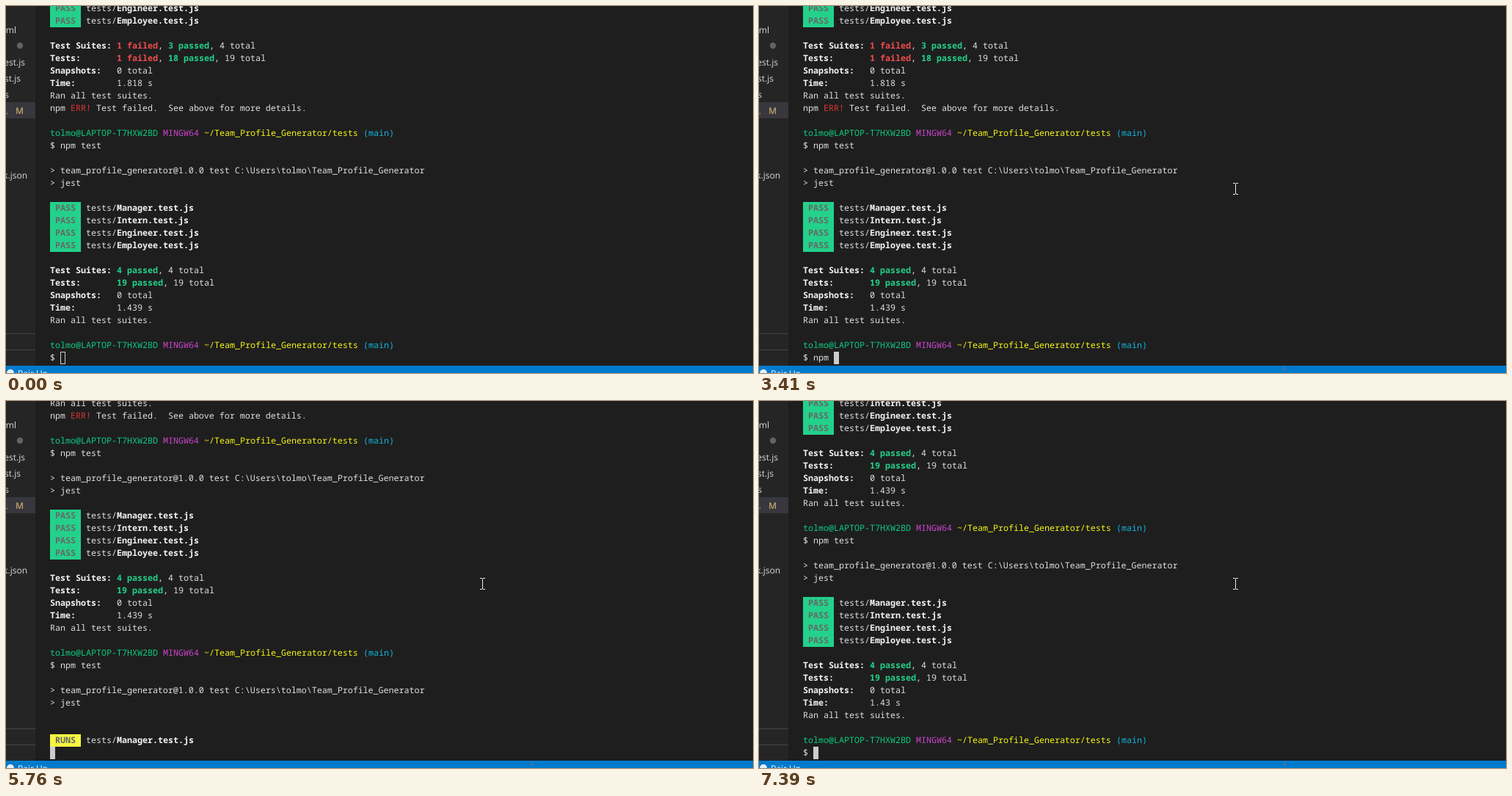
These frames come from a looping animation (1018 by 500 pixels, 8000 ms). An HTML page with a canvas:

```html
<!DOCTYPE html>
<html lang="en">
<head>
<meta charset="utf-8">
<title>Terminal test run</title>
<style>
  html, body { margin: 0; width: 100%; height: 100%; overflow: hidden; background: #1e1e1e; }
  canvas { display: block; }
</style>
</head>
<body>
<canvas id="stage" width="1018" height="500"></canvas>
<script>
const ctx = document.getElementById('stage').getContext('2d');
const LOOP = 8000;
const CELL = 7, LINE = 17, LEFT = 60, LAST_TOP = 471;
const MONO = '11.6667px "Noto Sans Mono", monospace';
const SANS = '12px "Open Sans", sans-serif';

// Style codes used as {x} inside terminal lines.
const STYLES = {
  w: { color: '#e0e0e0' },
  b: { color: '#f4f4f4', bold: true },
  R: { color: '#f14c4c', bold: true },
  G: { color: '#23d18b', bold: true },
  r: { color: '#dc3535' },
  g: { color: '#0dcb83' },
  m: { color: '#cb45cb' },
  y: { color: '#f5f518' },
  c: { color: '#12b5dc' },
  P: { color: '#666666', bold: true, back: '#23d18b' },
  Y: { color: '#666666', bold: true, back: '#f5f543' }
};

const USER = 'tolmo';
const PROMPT = `{g}${USER}@LAPTOP-T7HXW2BD {m}MINGW64 {y}~/Team_Profile_Generator/tests {c}(main)`;
const COMMAND = 'npm test';
const SUITES = ['Manager', 'Intern', 'Engineer', 'Employee'];

const pass = name => `{P} PASS {w} tests/{b}${name}.test.js`;
const runs = name => `{Y} RUNS {w} tests/{b}${name}.test.js`;
const PASSES = SUITES.map(pass);

const summary = (suites, tests, time) => [
  `{b}Test Suites: ${suites}{w}, 4 total`,
  `{b}Tests:       ${tests}{w}, 19 total`,
  '{b}Snapshots:   {w}0 total',
  `{b}Time:        {w}${time} s`,
  'Ran all test suites.'
];
const allPassed = time => summary('{G}4 passed', '{G}19 passed', time);

const LAUNCH = [
  '',
  `> team_profile_generator@1.0.0 test C:\\Users\\${USER}\\Team_Profile_Generator`,
  '> jest',
  ''
];

const HISTORY = [
  ...PASSES.slice(2),
  '',
  ...summary('{R}1 failed{w}, {G}3 passed', '{R}1 failed{w}, {G}18 passed', '1.818'),
  'npm {r}ERR!{w} Test failed.  See above for more details.',
  '', PROMPT, '$ ' + COMMAND,
  ...LAUNCH, ...PASSES, '', ...allPassed('1.439'),
  '', PROMPT
];

const progress = done => [...LAUNCH, ...PASSES.slice(0, done), '', runs(SUITES[done]), ''];
const finished = [...LAUNCH, ...PASSES, '', ...allPassed('1.43')];

const KEY_TIMES = [2570, 2800, 2950, 3410, 3580, 3730, 3900, 4120];

// [start, output lines, rows the cursor stands above the last line]
const OUTPUT = [
  [4440, ['']],
  [5070, [...LAUNCH, '']],
  [5680, [...LAUNCH, 'Determining test suites to run...']],
  [5760, progress(0)],
  [6850, progress(1)],
  [6930, progress(2)],
  [7010, progress(3)],
  [7090, [...LAUNCH, ...PASSES, '', ''], 1],
  [7160, [...finished.slice(0, -2), '']],
  [7240, [...finished, '']],
  [7390, [...finished, '', PROMPT, '$ ']]
];

// [start, left, top] of the mouse pointer
const POINTER = [
  [70, 713, 480], [140, 598, 470], [215, 452, 457], [290, 340, 446], [360, 292, 442],
  [540, 250, 453], [600, 232, 456], [770, 232, 458], [850, 232, 460], [1150, 232, 464],
  [1620, 350, 401], [1705, 555, 291], [1790, 646, 241]
];

const current = (steps, t) => steps.filter(step => step[0] <= t).pop();
const plain = line => line.replace(/\{\w\}/g, '');

function rect(color, x, y, w, h) {
  ctx.fillStyle = color;
  ctx.fillRect(x, y, w, h);
}

function disc(color, x, y, r) {
  ctx.fillStyle = color;
  ctx.beginPath();
  ctx.arc(x, y, r, 0, Math.PI * 2);
  ctx.fill();
}

function label(text, x, y, color = '#dadada', align = 'right', font = SANS) {
  ctx.font = font;
  ctx.textAlign = align;
  ctx.fillStyle = color;
  ctx.fillText(text, x, y);
}

function drawLine(line, top) {
  let x = LEFT, style = STYLES.w;
  line.split(/\{(\w)\}/).forEach((part, i) => {
    if (i % 2) {
      style = STYLES[part];
      return;
    }
    const width = part.length * CELL;
    if (style.back) rect(style.back, x, top, width, LINE);
    label(part, x, top + 12, style.color, 'left', (style.bold ? 'bold ' : '500 ') + MONO);
    x += width;
  });
}

function drawTerminal(t) {
  const output = current(OUTPUT, t);
  const typed = KEY_TIMES.filter(time => time <= t).length;
  const lines = [...HISTORY, '$ ' + COMMAND.slice(0, typed), ...(output ? output[1] : [])];
  const top = LAST_TOP - (lines.length - 1) * LINE;
  lines.forEach((line, i) => {
    const y = top + i * LINE;
    if (y > -LINE) drawLine(line, y);
  });

  const x = LEFT + plain(lines[lines.length - 1]).length * CELL;
  const y = LAST_TOP - (output && output[2] || 0) * LINE;
  rect('#cccccc', x, y, CELL, LINE);
  if (t < 1380) rect('#1e1e1e', x + 1, y + 1, CELL - 2, LINE - 2);
}

function drawSidebar() {
  rect('#252526', 0, 0, 40, 490);
  rect('#37373d', 0, 131, 40, 22);
  rect('#464646', 0, 446, 40, 1);
  rect('#464646', 0, 468, 40, 1);
  label('ml', 14, 37);
  disc('#636363', 19, 54, 4.2);
  label('est.js', 26, 81);
  label('st.js', 20, 103);
  label('s', 4, 125);
  label('.', 3, 147, '#c4a46b');
  label('M', 24, 147, '#c4a46b', 'right', '600 ' + SANS);
  label('k.json', 29, 235);
}

function drawStatusBar() {
  rect('#007acc', 0, 490, 1018, 10);
  disc('#e6f1f9', 6, 500, 5);
  label('Pair Up', 16, 505, '#ffffff', 'left');
}

function drawPointer(t) {
  if (t < 70) return;
  // faint remnant left where the pointer entered
  rect('#6a6a86', 716, 490, 1, 5);
  rect('#6a6a86', 714, 495, 5, 1);

  if (t >= 1380 && t < 1470) disc('rgba(190,178,20,0.83)', 233, 471, 15);
  const [, x, y] = current(POINTER, t);
  for (const end of [0, 15]) {
    rect('#f0f0f0', x, y + end, 3, 1);
    rect('#f0f0f0', x + 4, y + end, 3, 1);
  }
  rect('#f0f0f0', x + 3, y + 1, 1, 14);
}

function draw(t) {
  rect('#1e1e1e', 0, 0, 1018, 500);
  drawTerminal(t);
  drawSidebar();
  drawStatusBar();
  drawPointer(t);
}

ctx.textRendering = 'geometricPrecision';
const start = performance.now();
function tick() {
  draw((performance.now() - start) % LOOP);
  requestAnimationFrame(tick);
}
tick();
</script>
</body>
</html>
```
